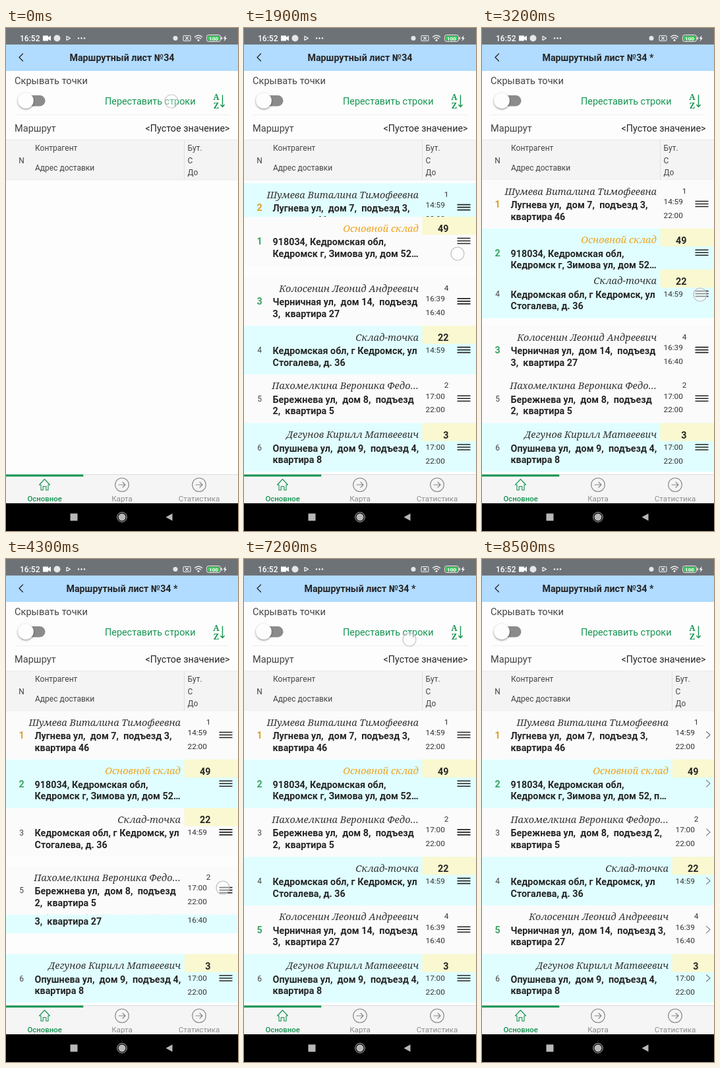
Write an HTML page that moves like this. It is 352 by 762 pixels and loops after 8900 ms.

```html
<!DOCTYPE html>
<html lang="ru">
<head>
<meta charset="utf-8">
<title>Маршрутный лист</title>
<style>
html, body { margin: 0; width: 100%; height: 100%; overflow: hidden; background: #fdfdfd; }
svg { display: block; }
text { font: 14.34px Roboto, sans-serif; fill: #262626; white-space: pre; }
.mid { text-anchor: middle; }
.end { text-anchor: end; }
.label { font-size: 14.6px; fill: #444; }
.small { font-size: 12px; fill: #444; }
.time { font-size: 11.8px; fill: #333; }
.bold { font-weight: 700; }
.name { font: italic 14.5px "Noto Serif", serif; fill: #333; }
.tab { font-size: 11.65px; fill: #8c8c8c; text-anchor: middle; }
.active { font-size: 11.4px; font-weight: 500; fill: #149450; }
.sort { font: 600 12.5px "Noto Serif", serif; fill: #149450; text-anchor: middle; }
.line { fill: none; stroke-linecap: round; stroke-linejoin: round; }
</style>
</head>
<body>
<svg width="352" height="762" viewBox="0 0 352 762">
  <defs>
    <clipPath id="clip"><rect y="230" width="352" height="446"/></clipPath>
    <filter id="shadow" x="-30%" y="-30%" width="160%" height="170%">
      <feDropShadow dx="0" dy="1.2" stdDeviation="1.6" flood-opacity=".5"/>
    </filter>
    <g id="arrowIcon" class="line" stroke="#858585" stroke-width="1.1">
      <circle r="10.3"/>
      <path d="M-5 0H5M1 -4L5 0L1 4"/>
    </g>
  </defs>
  <rect width="352" height="762" fill="#fdfdfd"/>

  <g id="statusBar">
    <rect width="352" height="25" fill="#6d7276"/>
    <text x="21" y="20" style="font-size:12px;font-weight:500;fill:#fff">16:52</text>
    <path d="M56 11.5h8v2.5l4-2.5v8l-4-2.5v2.5h-8z" fill="#fff"/>
    <circle cx="77.5" cy="15.5" r="5" fill="#e6e6e6"/>
    <path class="line" d="M92 12.5L97.5 15.5L92 18.5Z" stroke="#fff" stroke-width="1.1"/>
    <g fill="#fff">
      <circle cx="110" cy="15.5" r="1.2"/><circle cx="114.5" cy="15.5" r="1.2"/><circle cx="119" cy="15.5" r="1.2"/>
    </g>
    <circle cx="257" cy="15.5" r="3.5" fill="#e6e6e6"/>
    <g class="line" stroke="#eee" stroke-width="1.1">
      <rect x="269" y="11.5" width="11" height="8" rx="1.5"/>
      <path d="M272.5 13.5l4 4m0-4l-4 4"/>
      <path d="M286.5 13.5q5.5-4.5 11 0M288.5 16q3.5-2.8 7 0" stroke-width="1.5"/>
    </g>
    <circle cx="292" cy="18.5" r="1.5" fill="#fff"/>
    <rect x="304.5" y="10.5" width="21" height="10" rx="3" fill="none" stroke="#f0f0f0"/>
    <rect x="306" y="12" width="18" height="7" rx="1.8" fill="#3fc75c"/>
    <rect x="326.5" y="13.5" width="1.5" height="4" fill="#f0f0f0"/>
    <text class="mid bold" x="315" y="18.5" style="font-size:8px;fill:#fff">100</text>
    <path d="M333.5 11l-4 5h2.5l-1.5 4.5l4.5-5.5h-2.5z" fill="#fff"/>
  </g>

  <rect y="25" width="352" height="40" fill="#b1dbff"/>
  <path class="line" d="M25.5 39L20 44.5L25.5 50" stroke="#222" stroke-width="1.2"/>
  <text id="title" class="mid bold" x="176" y="50" style="font-size:14.25px"></text>

  <text class="label" x="13" y="85.3">Скрывать точки</text>
  <rect x="26" y="102" width="33.5" height="16.5" rx="8.2" fill="#8b8b8b"/>
  <circle cx="30" cy="110" r="11.8" fill="#fdfdfd" filter="url(#shadow)"/>
  <text class="green" x="150" y="116" style="font-size:14.4px;fill:#149450">Переставить строки</text>
  <text class="sort" x="319" y="109">A</text>
  <text class="sort" x="319" y="121.5">Z</text>
  <path class="line" d="M328.5 102V119.5M325.8 116.5L328.5 119.5L331.2 116.5" stroke="#149450" stroke-width="1.4"/>
  <rect x="13" y="131" width="326" height="1" fill="#efefef"/>
  <text class="label" x="13" y="157">Маршрут</text>
  <text class="end" x="339.5" y="157">&lt;Пустое значение&gt;</text>

  <g id="head">
    <rect y="169.5" width="352" height="60.5" fill="#f4f4f4"/>
    <path d="M0 169.5H352M0 230H352" stroke="#e9e9e9"/>
    <text class="small mid" x="23.5" y="205">N</text>
    <text class="small" x="44" y="186.3">Контрагент</text>
    <text class="small" x="44" y="216.2">Адрес доставки</text>
    <g class="right">
      <path d="M270.5 170V230" stroke="#e0e0e0"/>
      <text class="small" x="275.5" y="186.3">Бут.</text>
      <text class="small" x="275.5" y="204.7">С</text>
      <text class="small" x="275.5" y="223.3">До</text>
    </g>
  </g>

  <g id="list" clip-path="url(#clip)"></g>

  <g id="tabs">
    <rect y="676.5" width="352" height="43.5" fill="#f5f5f5"/>
    <rect y="676" width="352" height="1" fill="#dcdcdc"/>
    <rect y="676.5" width="117.3" height="3" fill="#149450"/>
    <path class="line" d="M50.5 692L58.5 683.5L66.5 692H64V700H60.8V694.5H56.2V700H53V692Z" stroke="#149450" stroke-width="1.1"/>
    <use href="#arrowIcon" x="176" y="692"/>
    <use href="#arrowIcon" x="293" y="692"/>
    <text class="tab active" x="58.7" y="717">Основное</text>
    <text class="tab" x="176" y="717">Карта</text>
    <text class="tab" x="293" y="717">Статистика</text>
  </g>

  <rect y="720" width="352" height="42" fill="#000"/>
  <g fill="#b8b8b8">
    <rect x="97.5" y="735.5" width="11" height="11"/>
    <circle cx="176" cy="741" r="5.5"/>
    <path d="M252.500 735.5V746.5L242.500 741Z"/>
  </g>
  <circle cx="176" cy="741" r="7.3" fill="none" stroke="#b8b8b8"/>

  <circle id="touch" r="10" fill="#fff" fill-opacity=".45" stroke="#bbbbc6" stroke-width="1.2"/>
</svg>
<script>
const LOOP = 8900, STEP = 100, TOP = 230, PITCH = 73.7;
const LOADED = 300, EDITED = 2200, VIEW = 7400;
const $ = id => document.getElementById(id);
const list = $('list'), touch = $('touch'), title = $('title');
const GREEN = '#3da366', ORANGE = '#dc9f2b';

// Address lines: "edit" beside the handles, "view" in the wider final layout.
const rows = {
  a: { name: 'Основной склад', tint: '#eda21d', mark: GREEN, count: 49, sum: true, times: [],
    edit: ['918034, Кедромская обл,', 'Кедромск г, Зимова ул, дом 52…'],
    view: ['918034, Кедромская обл,', 'Кедромск г, Зимова ул, дом 52, п…'],
    path: [[1500, 0], [1900, .76], [2100, 1]] },
  b: { name: 'Шумева Виталина Тимофеевна', mark: ORANGE, count: 1, times: ['14:59', '22:00'],
    edit: ['Лугнева ул,  дом 7,  подъезд 3,', 'квартира 46'],
    path: [[1700, 1], [1900, .07], [2000, 0]] },
  c: { name: 'Колосенин Леонид Андреевич', mark: GREEN, count: 4, times: ['16:39', '16:40'],
    edit: ['Черничная ул,  дом 14,  подъезд', '3,  квартира 27'],
    view: ['Черничная ул,  дом 14,  подъезд 3,', 'квартира 27'],
    path: [[2800, 2], [3000, 3], [4100, 3], [4300, 3.57], [4400, 4]] },
  d: { name: 'Склад-точка', count: 22, sum: true, times: ['14:59'],
    edit: ['Кедромская обл, г Кедромск, ул', 'Стогалева, д. 36'],
    path: [[2500, 3], [3200, 1.845], [3400, 2], [4500, 2], [4700, 3]] },
  e: { name: 'Пахомелкина Вероника Федо…', wide: 'Пахомелкина Вероника Федоро…', count: 2, times: ['17:00', '22:00'],
    edit: ['Бережнева ул,  дом 8,  подъезд', '2,  квартира 5'],
    view: ['Бережнева ул,  дом 8,  подъезд 2,', 'квартира 5'],
    path: [[4000, 4], [4300, 3.19], [4700, 2.3], [4900, 2]] },
  f: { name: 'Дегунов Кирилл Матвеевич', count: 3, sum: true, times: ['17:00', '22:00'],
    edit: ['Опушнева ул,  дом 9,  подъезд 4,', 'квартира 8'],
    path: [[0, 5]] }
};
const orders = [[0, 'abcdef'], [EDITED, 'bacdef'], [3500, 'badcef'], [4900, 'baedcf']];
const lifted = [[0, 'a'], [2300, 'd'], [3700, 'e']];

// time, x, y, opacity
const touches = [
  [0, 251, 111, .8], [100, 251, 111, .4], [200, 251, 111, 0],
  [1300, 330, 286, 0], [1400, 330, 286, 1], [1500, 330, 286, 1], [1900, 324, 342, 1],
  [2100, 324, 360, 1], [2300, 324, 360, 0],
  [2301, 331, 488, 0], [2400, 331, 488, 1], [2500, 331, 488, 1], [3200, 331, 404, 1],
  [3400, 331, 412, 1], [3600, 331, 412, 0],
  [3900, 329, 557, 0], [4000, 329, 557, 1], [4300, 329, 498, 1], [4700, 331, 440, 1],
  [4800, 331, 440, .6], [4900, 331, 440, .2], [5000, 331, 440, 0],
  [7199, 251, 122, 0], [7200, 251, 122, .9], [7300, 251, 122, .7], [7500, 251, 122, 0]
];

function add(parent, tag, attrs, text) {
  const el = document.createElementNS('http://www.w3.org/2000/svg', tag);
  for (const key in attrs) el.setAttribute(key, attrs[key]);
  if (text !== undefined) el.textContent = text;
  return parent.appendChild(el);
}

function build(row) {
  const g = row.el = add(list, 'g', {});
  row.bg = add(g, 'rect', { width: 352, height: PITCH });
  row.num = add(g, 'text', { class: row.mark ? 'mid bold' : 'mid small', x: 23.5, y: row.mark ? 42 : 41.3 });
  if (row.mark) row.num.style.fill = row.mark;
  row.lines = [43, 60.5].map(y => add(g, 'text', { class: 'bold', x: 43.5, y }));
  const right = add(g, 'g', { class: 'right' });
  row.label = add(right, 'text', { class: 'name end', x: 265, y: 22.5 });
  if (row.tint) row.label.style.fill = row.tint;
  if (row.sum) add(right, 'rect', { x: 270.5, width: 100, height: 27.3, fill: '#f9f8d0' });
  add(right, 'text', { class: row.sum ? 'bold end' : 'time end', x: 310.5, y: row.sum ? 23 : 20.7 }, row.count);
  row.times.forEach((time, i) =>
    add(right, 'text', { class: 'time', x: 275.5, y: (row.sum ? 40.6 : 36.9) + i * 20.8 }, time));
  row.handle = add(g, 'path', { d: 'M323.5 32.5H343.5M323.5 36.5H343.5M323.5 40.5H343.5', stroke: '#222', 'stroke-width': 1.6 });
  row.chevron = add(g, 'path', { class: 'line', d: 'M340.5 31.5L346 36.5L340.5 41.5', stroke: '#777', 'stroke-width': 1.1 });
}

// Linear interpolation over [time, ...values] keys.
function sample(keys, t) {
  const i = keys.findIndex(k => k[0] > t);
  if (i === 0) return keys[0].slice(1);
  if (i < 0) return keys[keys.length - 1].slice(1);
  const from = keys[i - 1], to = keys[i], p = (t - from[0]) / (to[0] - from[0]);
  return from.slice(1).map((v, n) => v + (to[n + 1] - v) * p);
}

const latest = (keys, t) => keys.filter(k => k[0] <= t).pop()[1];
const show = (el, on) => { el.style.display = on ? '' : 'none'; };

function render(t) {
  const view = t >= VIEW, order = latest(orders, t), top = rows[latest(lifted, t)].el;
  title.textContent = 'Маршрутный лист №34' + (t >= EDITED ? ' *' : '');
  show(list, t >= LOADED);
  if (list.lastChild !== top) list.appendChild(top);
  for (const key in rows) {
    const row = rows[key], slot = order.indexOf(key);
    const y = TOP + sample(row.path, t)[0] * PITCH;
    row.el.setAttribute('transform', `translate(0 ${y.toFixed(2)})`);
    row.bg.setAttribute('fill', slot % 2 ? '#e0feff' : '#fbfbfb');
    row.num.textContent = slot + 1;
    row.label.textContent = view && row.wide || row.name;
    const lines = view && row.view || row.edit;
    row.lines.forEach((el, i) => { el.textContent = lines[i]; });
    show(row.handle, !view);
    show(row.chevron, view);
  }
  for (const el of document.querySelectorAll('.right'))
    el.setAttribute('transform', `translate(${view ? 18 : 0} 0)`);
  const [x, y, opacity] = sample(touches, t);
  touch.setAttribute('transform', `translate(${x} ${y})`);
  touch.setAttribute('opacity', opacity);
}

Object.values(rows).forEach(build);
const start = performance.now();
let shown = -1;
function tick() {
  const t = Math.floor((performance.now() - start) % LOOP / STEP) * STEP;
  if (t !== shown) render(shown = t);
  requestAnimationFrame(tick);
}
tick();
</script>
</body>
</html>
```
